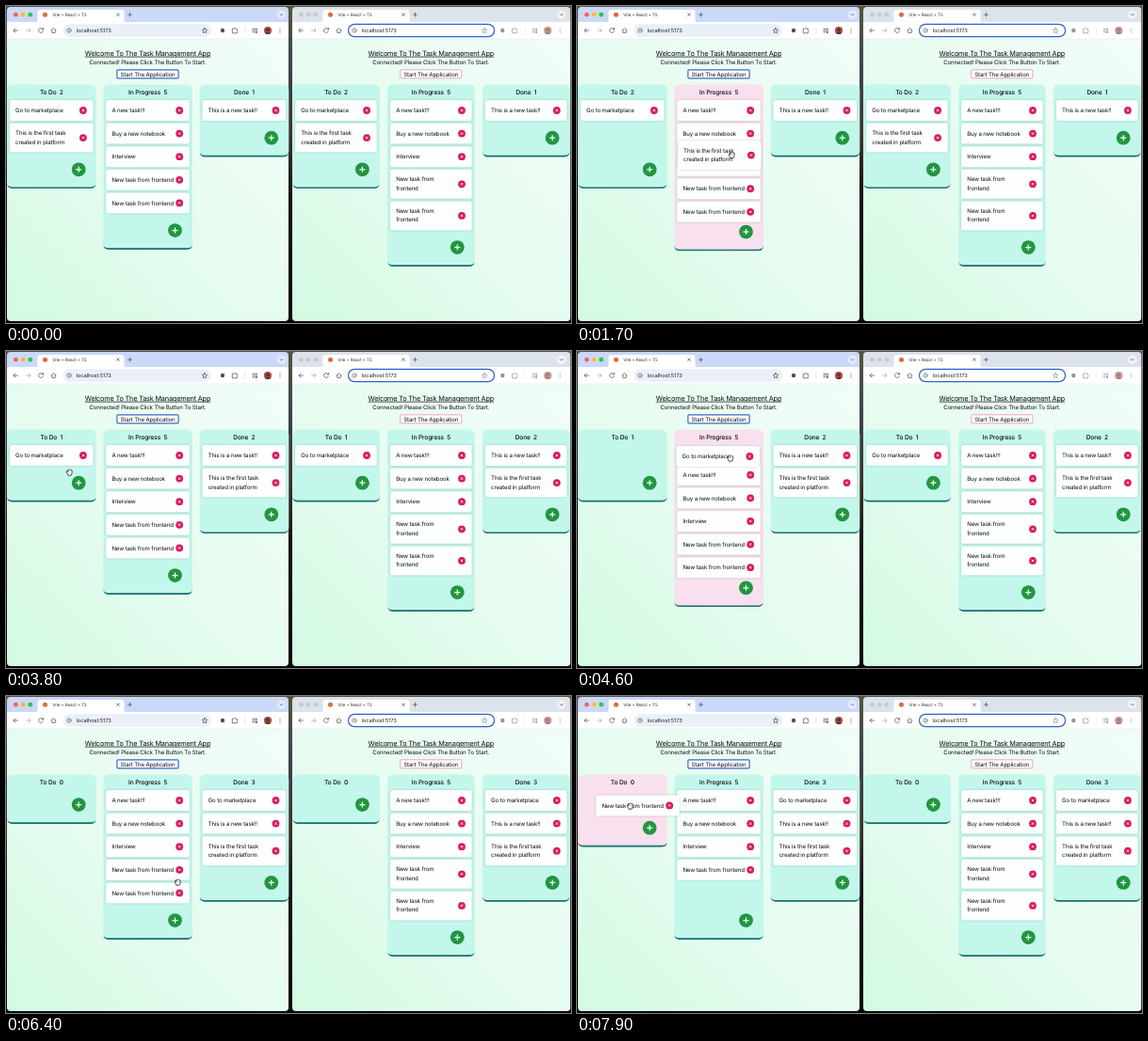
An HTML page that plays this animation: 600x337 px, repeating every 8 s.

```html
<!DOCTYPE html>
<html lang="en">
<head>
<meta charset="utf-8">
<title>Task board</title>
<style>
  html, body { margin: 0; width: 100%; height: 100%; overflow: hidden; background: #111; }
  svg { display: block; width: 600px; height: 337px; }
  text { font: 6.1px Inter, sans-serif; letter-spacing: -.02em; fill: #0b0b0b; text-rendering: geometricPrecision; }
  .title { font-size: 7.3px; letter-spacing: -.024em; text-decoration: underline; text-decoration-thickness: .6px; }
  .head { font-size: 6.6px; font-weight: 500; }
  .tab { font-size: 4.6px; fill: #333; }
  .url { font-size: 5.75px; fill: #222; }
  .mid { text-anchor: middle; }
  .icon { fill: none; stroke: #50545a; stroke-width: .75; stroke-linecap: round; stroke-linejoin: round; }
  .card rect { fill: #fdfefe; filter: drop-shadow(0 .8px 1px rgba(0, 40, 40, .22)); }
</style>
</head>
<body>
<svg id="stage" viewBox="0 0 600 337">
  <defs>
    <linearGradient id="desk" x2="0" y2="1">
      <stop stop-color="#56563f"/><stop offset=".2" stop-color="#3b4450"/><stop offset=".4" stop-color="#40342a"/>
      <stop offset=".6" stop-color="#151515"/><stop offset="1" stop-color="#050505"/>
    </linearGradient>
    <linearGradient id="page" x1="1" y1="0" x2="0" y2="1">
      <stop stop-color="#f2fdf8"/><stop offset=".5" stop-color="#e7fcf0"/><stop offset="1" stop-color="#d3fae3"/>
    </linearGradient>
  </defs>
  <rect width="600" height="337" fill="url(#desk)"/>
</svg>
<script>
const LOOP = 8000, STEP = 100, TOP = 83.6, FIRST = 100, GAP = 2.6;
const stage = document.getElementById('stage');

const windows = [
  { x: 1, w: 299, left: 0, right: 0, pillEnd: 218, col: 1, pitch: 102.3, colW: 94.7, center: 150.5,
    active: true, clock: 'settle' },
  { x: 304, w: 295.5, left: 303, right: 297.3, pillEnd: 518.6, col: 304.2, pitch: 100.9, colW: 92.7, center: 451.3,
    active: false, clock: 'sync' },
];
const names = ['To Do', 'In Progress', 'Done'];
const start = [['market', 'first'], ['a', 'book', 'talk', 'new1', 'new2'], ['done']];
const tasks = {
  market: ['Go to marketplace'],
  first: ['This is the first task', 'created in platform'],
  a: ['A new task!!!'],
  book: ['Buy a new notebook'],
  talk: ['Interview'],
  new1: ['New task from frontend'],
  new2: ['New task from frontend'],
  done: ['This is a new task!!'],
};
const narrow = { new1: ['New task from', 'frontend'], new2: ['New task from', 'frontend'] };

// over: [column, insert index, enter, leave]
const moves = [
  { id: 'first', from: 0, to: 2, at: 1, grab: 1300, drop: 2300, settle: 2700, sync: 3000,
    over: [[0, 9, 1300, 1630], [1, 2, 1630, 2050], [2, 1, 2050, 2700]] },
  { id: 'market', from: 0, to: 2, at: 0, grab: 4200, drop: 5000, settle: 5400, sync: 5700,
    over: [[0, 9, 4200, 4450], [1, 0, 4450, 4730], [2, 0, 4730, 5400]] },
  { id: 'new2', from: 1, to: 0, at: 0, grab: 7400, drop: 9000, settle: 9000, sync: 9000,
    over: [[1, 9, 7400, 7650], [0, 0, 7650, 9000]] },
];
const pointerPath = [
  [500, 112, 186], [1000, 61, 140], [1400, 61, 140], [1700, 164, 158.5], [2200, 262, 148], [2300, 262, 148],
  [2500, 236, 144], [3800, 67, 129], [4000, 61, 113], [4300, 61, 113], [4900, 264, 115], [5300, 265, 125],
  [5600, 262, 174], [6800, 142, 210], [7400, 142, 210], [7900, 56, 117],
];

const clamp = v => Math.max(0, Math.min(1, v));
const smooth = v => (v = clamp(v)) * v * (3 - 2 * v);
const mix = (a, b, u) => a + (b - a) * u;
const lines = (win, id) => (!win.active && narrow[id]) || tasks[id];
const height = (win, id) => lines(win, id).length > 1 ? 31 : 22;
const colX = (win, i) => win.col + win.pitch * i;

function add(parent, markup) {
  parent.insertAdjacentHTML('beforeend', markup);
  return parent.lastElementChild;
}
const move = (el, x, y) => el.setAttribute('transform', `translate(${x.toFixed(2)} ${y.toFixed(2)})`);

function drawChrome(win, n) {
  const { x, w, left, right, pillEnd, center, active } = win;
  const lights = active ? ['#fe5f57', '#febc2e', '#28c840'] : ['#c6c9cf', '#c6c9cf', '#c6c9cf'];
  add(stage, `<clipPath id="clip${n}"><rect x="${x}" y="1" width="${w}" height="334" rx="4"/></clipPath>`);
  add(stage, `<g clip-path="url(#clip${n})">
    <rect x="${x}" y="1" width="${w}" height="17" fill="${active ? '#cad9fa' : '#dde3ec'}"/>
    <rect x="${x}" y="17" width="${w}" height="18" fill="#fff"/>
    <rect x="${x}" y="35" width="${w}" height="300" fill="url(#page)"/>
    <path d="M${x} 35h${w}" stroke="#d9e2e6" stroke-width=".5"/>
    <g transform="translate(${left})">
      ${lights.map((c, i) => `<circle cx="${10.4 + i * 7.7}" cy="9.2" r="2.4" fill="${c}"/>`).join('')}
      <path d="M31 17.5q2.5 0 2.5-3V7q0-3 3-3h86q3 0 3 3v7.5q0 3 2.5 3z" fill="#fff"/>
      <circle cx="41.5" cy="9.2" r="2.5" fill="#e0693c"/>
      <text class="tab" x="49.3" y="11">Vite + React + TS</text>
      <path class="icon" d="M117.7 7.9l2.6 2.6m0-2.6l-2.6 2.6M129.5 9.2h4M131.5 7.2v4
        M12.5 26H8m2-2l-2 2 2 2M39.2 24.6a2.5 2.5 0 1 0 .2 2.3M39.6 23.4v1.6h-1.6
        M48 26l2.5-2.4L53 26M48.8 25.8v2.6h3.4v-2.6"/>
      <path class="icon" style="stroke:#a9adb3" d="M21.5 26H26m-2-2l2 2-2 2"/>
    </g>
    <rect x="${left + 60.5}" y="19.3" width="${pillEnd - left - 60.5}" height="13.4" rx="6.7"
      fill="${active ? '#eaf0f9' : '#fff'}" ${active ? '' : 'stroke="#2b63c6" stroke-width="1.2"'}/>
    <g transform="translate(${left})">
      <circle class="icon" style="stroke-width:.6" cx="67" cy="26" r="2.2"/>
      <path class="icon" style="stroke-width:.6" d="M67 25.9v1M67 24.8v.1"/>
      <text class="url" x="74.7" y="28">localhost:5173</text>
    </g>
    <g transform="translate(${right})" opacity="${active ? 1 : .6}">
      <path class="icon" d="M211 23.3l.8 1.8 2 .2-1.5 1.4.4 2-1.7-1-1.7 1 .4-2-1.5-1.4 2-.2z"/>
      <circle cx="230" cy="26" r="2.2" fill="#4b4f55"/>
      <path class="icon" d="M240.7 24.2h1.6q.7-1.8 1.4 0h1.6v1.6q1.6.7 0 1.4v1.6h-4.6z
        M261.8 24.2h4.4M261.8 26h3M261.8 27.8h2M266.2 24.4v3.4"/>
      <path d="M254 22.5v7" stroke="#cfdaf0" stroke-width=".7"/>
      <circle cx="265.7" cy="28" r="1" fill="#50545a"/>
      <circle cx="278" cy="26" r="4.1" fill="#b5473d"/>
      <path d="M275 28.9q3-3 6 0q-3 2.2-6 0z" fill="#3d3a3a"/><circle cx="278" cy="25.2" r="1.8" fill="#3d3a3a"/>
      <path d="M291 24v.1M291 26v.1M291 28v.1" stroke="#50545a" stroke-width="1.1" stroke-linecap="round"/>
    </g>
    <g transform="translate(${right})">
      <circle cx="292.5" cy="9.2" r="4.8" fill="${active ? '#e3ebfc' : '#f0f3f7'}"/>
      <path class="icon" d="M290.9 8.5l1.6 1.6 1.6-1.6"/>
    </g>
    <text class="title mid" x="${center}" y="52.7">Welcome To The Task Management App</text>
    <text class="mid" x="${center}" y="62.3">Connected! Please Click The Button To Start.</text>
    <rect x="${center - 32.6}" y="67.8" width="65.2" height="9" rx="${active ? 1 : .5}" fill="#fff"
      stroke="${active ? '#3a6bbd' : '#ee8fae'}" stroke-width="${active ? 1.2 : .8}"/>
    <text class="mid" x="${center}" y="74.6">Start The Application</text>
  </g>`);
}

function makeColumn(win, i) {
  const x = colX(win, i), w = win.colW, inner = w - 11;
  const g = add(stage, `<g>
    <rect x="${x}" y="${TOP}" width="${w}" rx="5.5"/>
    <path d="M${x}-6.5q0 4.8 5.5 4.8h${inner}q5.5 0 5.5-4.8q0 6.5-5.5 6.5h-${inner}q-5.5 0-5.5-6.5z" fill="#17706f"/>
    <text class="head mid" x="${x + w / 2}" y="94.2"></text>
    <g><circle r="7.4" fill="#21963f"/><path d="M-3 0h6M0-3v6" stroke="#fff" stroke-width="1.2"/></g>
  </g>`);
  const [fill, edge, head, plus] = g.children;
  return { fill, edge, head, plus };
}

function makeCard(win, id) {
  const rows = lines(win, id), h = height(win, id), first = rows.length > 1 ? 12.7 : 13.2;
  return add(stage, `<g class="card">
    <rect width="${win.colW - 6}" height="${h}" rx="2.2"/>
    ${rows.map((row, i) => `<text x="6.2" y="${first + i * 9.4}">${row}</text>`).join('')}
    <g transform="translate(${win.colW - 16.7} ${h / 2})">
      <circle r="3.9" fill="#d81b60"/><path d="M-1.2-1.2l2.4 2.4m0-2.4l-2.4 2.4" stroke="#fff" stroke-width=".8"/>
    </g>
  </g>`);
}

windows.forEach((win, n) => {
  drawChrome(win, n);
  win.columns = names.map((_, i) => makeColumn(win, i));
  win.cards = {};
  for (const id in tasks) win.cards[id] = makeCard(win, id);
});

const hand = add(stage, `<g><path d="M-2.6 .2q-.8-1.2.3-1.4l.8.6v-1.8q.5-1 1.2-.1q.6-1 1.2 0q.8-.7 1.2.2q1-.3 1 .8v1.8
  q0 1.5-1 2.9h-3.2q-.5-1.4-1.5-3z" fill="#fff" stroke="#111" stroke-width=".75" stroke-linejoin="round"/>
  <path d="M-.3-1.4v1.2M.9-1.3v1.1" stroke="#111" stroke-width=".4"/></g>`);

function pointerAt(t) {
  const next = pointerPath.findIndex(p => p[0] > t);
  if (next < 0) return pointerPath.at(-1).slice(1);
  if (!next) return pointerPath[0].slice(1);
  const [a, b] = [pointerPath[next - 1], pointerPath[next]];
  const u = (t - a[0]) / (b[0] - a[0]);
  return [mix(a[1], b[1], u), mix(a[2], b[2], u)];
}

function listsAt(t, clock) {
  const lists = start.map(list => [...list]);
  for (const m of moves) {
    if (t < m[clock]) continue;
    lists[m.from] = lists[m.from].filter(id => id !== m.id);
    lists[m.to].splice(m.at, 0, m.id);
  }
  return lists;
}

// How far a hovered column has opened its slot
const opening = ([, , enter, leave], t) => smooth((t - enter) / 200) * (1 - smooth((t - leave) / 200));

function slotY(win, list, index) {
  return list.slice(0, index).reduce((y, id) => y + height(win, id) + GAP, FIRST);
}

function renderBoard(win, t) {
  const lists = listsAt(t, win.clock);
  const drag = win.active && moves.find(m => t >= m.grab && t < m.settle);
  const room = drag ? height(win, drag.id) + GAP : 0;

  lists.forEach((list, i) => {
    const { fill, edge, head, plus } = win.columns[i];
    const spans = drag ? drag.over.filter(o => o[0] === i) : [];
    const hover = spans.find(o => t >= o[2] && t < o[3]);
    const gaps = drag && drag.from !== i ? spans : [];
    const flow = list.filter(id => !drag || id !== drag.id);
    flow.forEach((id, k) => {
      const shift = gaps.reduce((s, o) => s + (k >= o[1] ? opening(o, t) * room : 0), 0);
      move(win.cards[id], colX(win, i) + 2.9, slotY(win, flow, k) + shift);
    });
    const grown = gaps.reduce((s, o) => s + opening(o, t - 45) * room, 0);
    const bottom = slotY(win, list, list.length) + 35.9 + grown;
    fill.setAttribute('height', bottom - TOP - .6);
    fill.setAttribute('fill', hover ? '#f8e0ef' : '#c3f7ec');
    move(edge, 0, bottom);
    head.textContent = `${names[i]}\u00a0\u00a0${list.length}`;
    move(plus, colX(win, i) + win.colW - 18.5, bottom - 20.3);
  });
  if (drag) renderDragged(win, drag, lists, t);
}

function renderDragged(win, drag, lists, t) {
  const homeX = colX(win, drag.from) + 2.9;
  const homeY = slotY(win, lists[drag.from], lists[drag.from].indexOf(drag.id));
  const [gx, gy] = pointerAt(drag.grab);
  const [px, py] = pointerAt(Math.min(t, drag.drop));
  const u = 1 - (1 - clamp((t - drag.drop) / (drag.settle - drag.drop || 1))) ** 2;
  const card = win.cards[drag.id];
  move(card,
    mix(homeX + px - gx, colX(win, drag.to) + 2.9, u),
    mix(homeY + py - gy, slotY(win, lists[drag.to], drag.at), u));
  if (card.nextElementSibling !== hand) stage.insertBefore(card, hand);
}

function frame(now) {
  const t = Math.floor(now % LOOP / STEP) * STEP;
  for (const win of windows) renderBoard(win, t);
  hand.style.display = t < 500 ? 'none' : '';
  move(hand, ...pointerAt(t));
  requestAnimationFrame(frame);
}
frame(performance.now());
</script>
</body>
</html>
```
